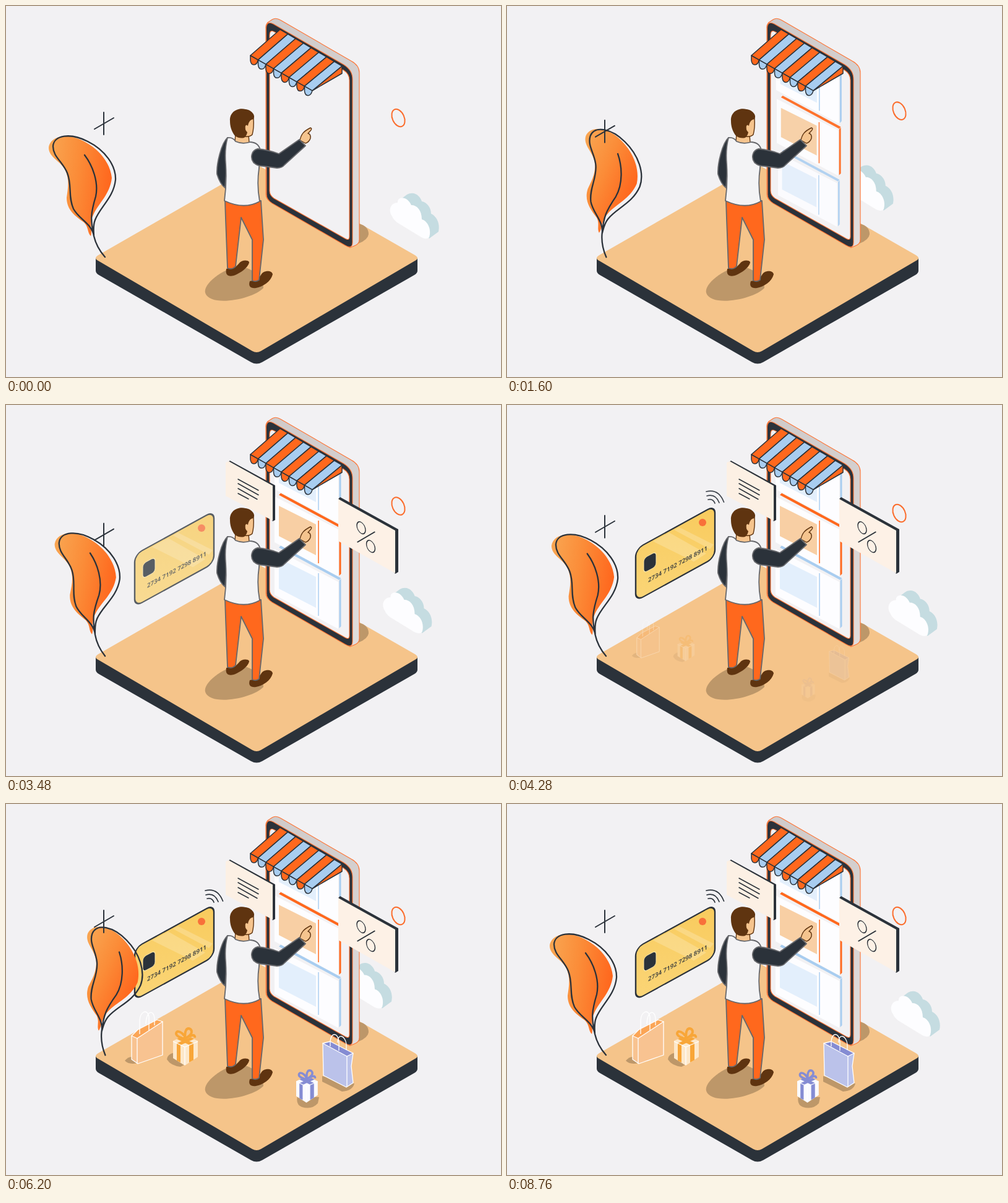
Animation, 800 px wide and 600 px high, one loop 8.92 s. Source, as an HTML page:

```html
<!DOCTYPE html>
<html lang="en">
<head>
<meta charset="utf-8">
<title>Mobile shopping</title>
<style>
  html, body { margin: 0; width: 100%; height: 100%; overflow: hidden; background: #f2f1f3; }
  svg { display: block; width: 100%; height: 100%; }
  .ink { stroke: #2b323a; fill: none; stroke-linecap: round; stroke-linejoin: round; }
  .cloth { stroke: #66676b; stroke-width: 1.8; stroke-linejoin: round; }
  .skin { fill: #f5c48e; stroke: #5f3410; stroke-width: 1.4; stroke-linejoin: round; }
  .shade { fill: #bd9769; }
  .thin { stroke: #fff; stroke-width: 1.3; stroke-linejoin: round; }
</style>
</head>
<body>
<svg viewBox="0 0 800 600" preserveAspectRatio="xMidYMid meet">
  <defs>
    <linearGradient id="leafFill" x1="0" y1=".3" x2="1" y2=".5">
      <stop offset="0" stop-color="#f9a450"/><stop offset=".45" stop-color="#fb8c38"/><stop offset="1" stop-color="#ff651c"/>
    </linearGradient>
    <linearGradient id="gold" x1="0" y1="1" x2="1" y2="0">
      <stop offset="0" stop-color="#fbd577"/><stop offset=".5" stop-color="#f9d06a"/><stop offset="1" stop-color="#f9cb5d"/>
    </linearGradient>
    <linearGradient id="frame" x1="0" y1="0" x2="0" y2="1">
      <stop offset="0" stop-color="#d0cbca"/><stop offset="1" stop-color="#e2dedd"/>
    </linearGradient>
    <path id="glass" d="M426 48Q426 37 434 42L546 104Q555 110 555 120V373Q555 380 548 376L433 311Q426 306 426 299Z"/>
    <clipPath id="screenClip"><use href="#glass"/></clipPath>
  </defs>

  <path fill="#2b323a" d="M145 408V428Q145 432 150 435L396 576Q405 581 414 576L660 435Q665 432 665 428V408Z"/>
  <path fill="#f5c48a" d="M149 403Q141 408 149 412L398 558Q405 562 412 558L661 412Q669 408 661 403L412 260Q405 256 398 260Z"/>

  <g id="cloud">
    <path fill="#c5dce1" d="M636 314L648 305C660 298 670 308 672 316C680 317 687 326 687 336C696 340 702 352 699 365L684 376Z"/>
    <path fill="#fdfdff" d="M624 340C617 330 622 318 633 318C632 308 648 306 655 322C664 322 672 330 672 345C682 348 688 362 684 374C680 378 674 376 668 372L632 350C628 347 625 343 624 340Z"/>
  </g>

  <path class="shade" d="M570 352Q586 356 586 369Q585 378 570 384Z"/>
  <g stroke="#ff7433" stroke-width="1.1">
    <path fill="url(#frame)" d="M420 36Q419 28 427 24L430 22Q436 18 444 23L558 89Q571 96 571 108V378Q571 384 565 387L556 391L428 317Q420 312 420 304Z"/>
    <path fill="#2b323a" d="M420.5 38Q420 23 432 29L546 95Q560 104 560 118V382Q560 394 548 387L430 319Q421 313 421 305Z"/>
    <use href="#glass" fill="#f2f1f3"/>
  </g>
  <g id="products" clip-path="url(#screenClip)"></g>
  <g id="awning" stroke="#2b323a" stroke-width="1.5" stroke-linejoin="round"></g>

  <g id="memo">
    <path fill="#2b323a" d="M359 92L362 90L435 130V186L431 188Z"/>
    <path fill="#fcf0e4" d="M355 93L360 91L431 130.500V187L355 147Z"/>
    <path class="ink" stroke-width="1.5" d="M375 120L408 138M375 127L408 145.500M375 135L406 152.500M375 143L392 152"/>
  </g>
  <g id="offer">
    <path fill="#2b323a" d="M537 152L540 149L634 201V270L629 273Z"/>
    <path fill="#fdf1e6" d="M537 152L629 203V272L537 220Z"/>
    <g class="ink" stroke-width="1.4" transform="matrix(1 .55 0 1 582 213.500)">
      <ellipse cx="-8" cy="-10.500" rx="7" ry="9"/>
      <ellipse cx="7.500" cy="11" rx="7" ry="9"/>
      <path d="M14 -16L-14 16"/>
    </g>
  </g>

  <g id="card">
    <g transform="matrix(1 -.55 0 1 208 233)">
      <rect width="128" height="84" rx="12" fill="url(#gold)"/>
      <path fill="#fff" opacity=".2" d="M28 3H54L114 70L94 72ZM62 3H70L126 62L120 66Z"/>
      <rect width="128" height="84" rx="12" class="ink" stroke-width="2.4"/>
      <rect x="13" y="22" width="20" height="24" rx="5.500" fill="#2b323a" stroke="#fbe6ac" stroke-width="1"/>
      <text x="20" y="65" font-family="'Open Sans', sans-serif" font-size="9.7" font-weight="600" fill="#2b323a">2734 7192 7298 8911</text>
    </g>
    <circle cx="316" cy="190" r="6" fill="#f8703a"/>
  </g>
  <path id="signal" class="ink" stroke-width="1.7" d="M322 140Q342 135 350.500 157M323 147Q337 143 343 158M325 153Q333 151 336 159"/>

  <g id="gifts"></g>

  <g id="leaf">
    <path fill="url(#leafFill)" d="M137 372C131 366 134 358 126 350C112 340 98 330 98 310C100 295 103 282 96 266C88 250 69 245 69 229C71 213 90 207 112 213C145 224 168 250 171 278C168 305 150 318 141 338C134 352 140 365 137 372Z"/>
    <path class="ink" stroke-width="2.300" d="M142 372C139 352 118 345 109 328C100 308 107 290 99 270C92 252 76 244 76 227C77 208 105 205 132 219C160 233 178 258 177 281C174 310 152 325 144 346C140 356 142 366 142 372M127 241C140 258 150 285 145 308C137 335 136 345 142 372C145 385 152 397 160 406"/>
  </g>
  <path id="cross" class="ink" stroke-width="2" d="M158 172V208M143 199L174 181"/>
  <g id="ring"><ellipse cx="634" cy="181" rx="9.500" ry="15" transform="rotate(-24 634 181)" fill="none" stroke="#fb6c2b" stroke-width="2"/></g>

  <g id="man">
    <path class="shade" d="M322 464C318 450 350 424 378 421C400 424 416 440 416 456C400 474 330 488 322 464Z"/>
    <path fill="#5f3410" d="M356 425C354 436 360 438 368 436C380 432 393 421 393 414C390 410 380 411 376 417L370 423ZM394 445C391 454 396 457 404 456C415 454 428 446 431 434C430 427 416 427 412 435L406 443Z"/>
    <path class="cloth" fill="#ff681d" d="M354 315L355 345L358 424Q366 427 371 421L380 342L398 378V444Q404 447 409 443L416 378L412 315Z"/>
    <path class="cloth" fill="#2b323a" d="M358 213C348 222 340 255 341 272Q346 288 354 294L358 245Z"/>
    <path class="skin" d="M371 206L370 220Q382 224 393 221L392 208Z"/>
    <path class="cloth" fill="#f3f3f5" d="M358 213Q367 212 371 219Q382 224 395 220Q409 221 411 234L409 262Q405 290 410 316Q385 330 353 315Q357 285 355 255Q353 232 358 213Z"/>
    <path class="skin" d="M386 184L400 182Q401 197 398 208Q394 212 386 211Z"/>
    <path fill="#5f3410" d="M362 186C361 170 376 164 387 167C397 168 404 177 400 183C394 184 392 188 391 194Q388 190 386 196Q387 202 390 204Q389 210 385 213Q377 215 370 210C364 202 362 194 362 186Z"/>
    <path class="skin" d="M475 217C477 208 480 203 492 197Q496 198 491 203L488 206Q493 207 492 214Q490 220 484 222Z"/>
    <path class="cloth" fill="#2b323a" d="M407 231C397 233 394 245 400 253Q406 259 416 259L438 262Q446 262 450 257L484 226L474 216L441 239Q425 233 407 231Z"/>
  </g>
</svg>
<script>
const $ = id => document.getElementById(id);
const LOOP = 8920;
const ORANGE = '#ff681d', BLUE = '#a8cdf0';

// Product tiles, 85 px apart on the phone screen
const tile = (dy, edge, picture) => `<g class="tile"><g transform="translate(0 ${dy})">
  <path fill="#fdfdff" d="M434 148L537 201V277L434 222Z"/>
  <path fill="${picture}" d="M441 163L501 193V243L441 212Z"/>
  <path stroke="${edge}" stroke-width="1.5" d="M505 187V256"/>
  <path fill="${edge}" d="M441 145.500L444 142.500L541.500 195L538.500 198ZM538.500 199L541.500 196V273L538.500 276Z"/></g></g>`;
$('products').innerHTML = tile(-86, BLUE, '#e3effc') + tile(0, ORANGE, '#f8cfa4') + tile(85, BLUE, '#e3effc');

// Striped awning
let stripes = `<path fill="${ORANGE}" d="M495 137L543 97V109Z"/>`;
for (let i = 0; i < 8; i++) {
  const x = 395 + i * 12.5, y = 80 + i * 7.1, top = 443 + i * 12.5, topY = 38 + i * 7.4;
  stripes += `<g fill="${i % 2 ? BLUE : ORANGE}">
    <path d="M${x} ${y}v8c1 9 10 10 12.500 -1v0Z"/>
    <path d="M${x} ${y}L${top} ${topY}l12.500 7.400L${x + 12.5} ${y + 7.1}Z"/></g>`;
}
$('awning').innerHTML = stripes;

// Presents on the floor
const box = (x, y, size, ribbon, paper, shade) => `<path class="shade" d="${shade}"/>
  <g transform="translate(${x} ${y}) scale(${size})">
  <path fill="${paper}" d="M0 22L20 13L40 22V48L19 62L0 50Z"/>
  <path fill="${ribbon}" d="M6 26L12 29V57L6 54ZM26 29L33 26V53L26 57ZM6 19L12 16L34 26L27 29ZM28 16L34 19L12 29L6 26Z"/>
  <path class="thin" fill="none" d="M0 23L19 32L40 23M19 32V61"/>
  <path fill="none" stroke="${ribbon}" stroke-width="4" stroke-linejoin="round" d="M20 18C6 17 2 10 7 7C12 6 18 12 20 18C18 6 22 0 28 3C33 8 28 14 20 18C30 12 36 11 35 17"/></g>`;
const orangeBag = `<path class="shade" d="M192 415Q198 408 204 409L213 419Q198 422 192 415Z"/>
  <g class="thin"><path fill="#f8c391" d="M203 375L253 352V406L213 420L203 413Z"/>
  <path fill="#fba556" d="M203 375L213 365L244 349L253 352L212 379Z"/>
  <path fill="none" d="M216 372V350C217 336 228 330 231 344V366M226 356C227 334 238 332 240 346V358M212 379V420"/></g>`;
const violetBag = `<path class="shade" d="M511 440V449L543 465Q560 464 563 452Z"/>
  <g class="thin"><path fill="#bbc2ea" d="M512 387L561 403L558 424L561 451L550 458L513 439Z"/>
  <path fill="#858cd3" d="M512 387L524 384L561 403L551 408Z"/>
  <path fill="none" d="M524 392V384C526 368 536 370 538 384V399M536 386C536 370 548 374 550 388V398M551 408V457"/></g>`;
const orangeBox = box(270, 361, 1, '#f8a638', '#fde8ca', 'M272 402Q260 405 260 413Q266 423 282 425L292 420Z');
const violetBox = box(469, 429, .87, '#858cd3', '#fafaff', 'M471 473Q468 486 478 490Q494 495 504 484L506 474Z');
$('gifts').innerHTML = [orangeBag, orangeBox, violetBag, violetBox].map(s => `<g>${s}</g>`).join('');

const clamp = u => Math.min(1, Math.max(0, u));
const smooth = u => (1 - Math.cos(Math.PI * clamp(u))) / 2;
const move = (el, x, y) => el.setAttribute('transform', `translate(${x} ${y})`);
// There-and-back swing; stops after the given number of cycles
const swing = (t, period, cycles, rise = period / 2) => {
  if (t >= period * cycles) return 0;
  const u = t % period;
  return u < rise ? smooth(u / rise) : 1 - smooth((u - rise) / (period - rise));
};
const slideIn = (el, t, start, length, dy) => {
  const p = smooth((t - start) / length);
  el.setAttribute('opacity', p);
  move(el, 0, dy * (1 - p));
};
const popIn = (el, t, start, length, cx, cy, from) => {
  const p = smooth((t - start) / length), s = from + (1 - from) * p;
  el.setAttribute('opacity', p);
  el.setAttribute('transform', `translate(${cx} ${cy}) scale(${s}) translate(${-cx} ${-cy})`);
};

const tiles = [...document.querySelectorAll('.tile')];
const gifts = [...$('gifts').children];
const giftCentres = [[228, 380], [288, 395], [537, 420], [487, 460]];

function draw(t) {
  $('leaf').setAttribute('transform', `rotate(${19.5 * swing(t, 4000, 2)} 159.500 407.500)`);
  const drift = swing(t, 4000, 2, 1900);
  move($('cloud'), -80 * drift, -48 * drift);
  const bob = swing(t, 2000, 3);
  move($('cross'), 0, 37 * bob);
  move($('ring'), 0, -33 * bob);

  tiles.forEach((el, i) => popIn(el, t, 700 + 75 * i, 1000, 489, 124 + 85 * i, .5));
  slideIn($('memo'), t, 2000, 1000, -30);
  slideIn($('offer'), t, 2000, 1000, 30);
  slideIn($('card'), t, 2800, 1000, 39);
  $('signal').setAttribute('opacity', smooth((t - 3800) / 600));
  gifts.forEach((el, i) => popIn(el, t, 3900 + 70 * i, 1000, ...giftCentres[i], .6));
}

function tick() {
  draw(performance.now() % LOOP);
  requestAnimationFrame(tick);
}
tick();
</script>
</body>
</html>
```
